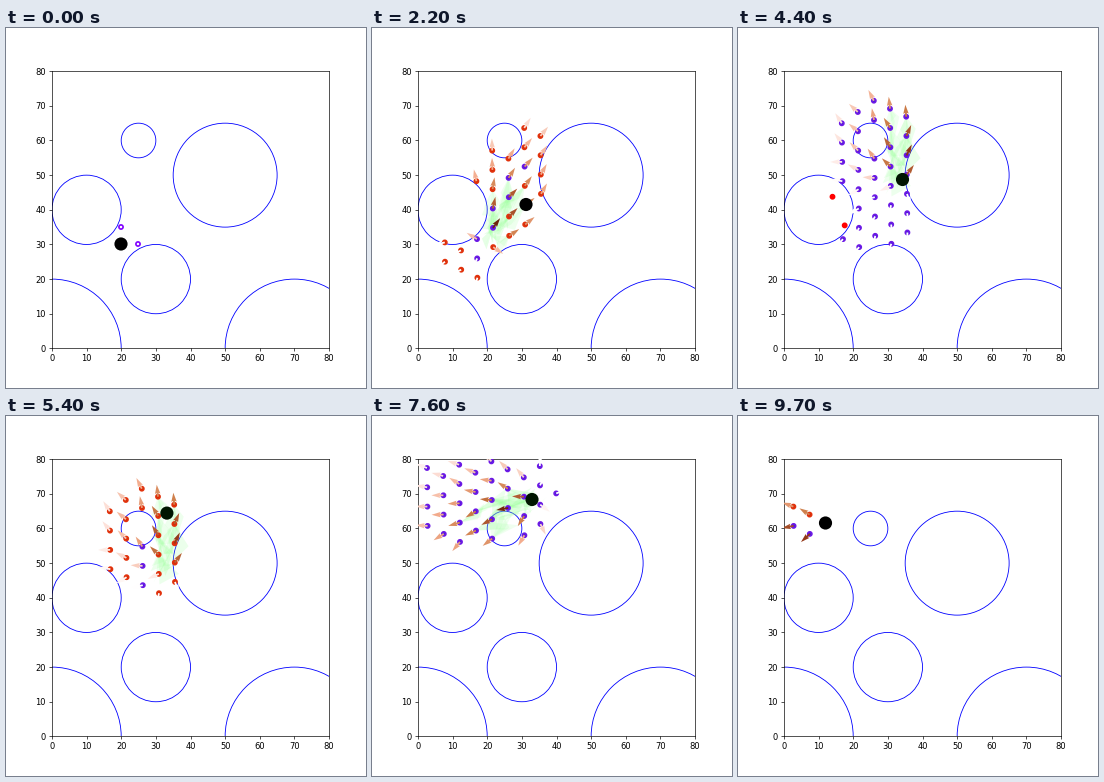
These frames come from a looping animation (360x360 px, 10000 ms). A matplotlib script:

```python
import math
import random
from collections import namedtuple

import numpy as np
import matplotlib.pyplot as plt
from matplotlib.animation import FuncAnimation
from matplotlib.collections import PolyCollection
from matplotlib.colors import LinearSegmentedColormap
from matplotlib.patches import Circle

FRAMES = 100
OBSTACLES = [(0, 0, 20), (70, 0, 20), (30, 20, 10), (10, 40, 10), (50, 50, 15), (25, 60, 5)]

# Frames in which something moves; the picture holds in between.
ACTIVE = [(0, 13), (18, 24), (26, 31), (34, 46), (51, 55), (57, 57),
          (61, 64), (67, 80), (86, 90), (92, 97)]

# Robot path in stage pixels: frame, x, y
STOPS = np.array([(0, 115, 216), (17, 115, 216), (22, 154, 176.5), (24, 164.5, 151.5),
                  (50, 164.5, 151.5), (55, 160, 83.5), (85, 160, 83.5), (90, 87.5, 107)])
HUBS = [(115, 216), (164.5, 151.5), (160, 83.5), (87.5, 107)]
HUB_STARTS = [34, 67, 92]

# Bearing in degrees, seen from the hub, in which the arrows are darkest
SWEEP = np.array([(1, 90), (13, 270), (22, 296), (31, 296), (34, 41), (44, 270),
                  (67, 263), (76, 160), (80, 115), (92, 110), (97, 162)])

# A wave fills the mesh within a radius of its spine a-b, spreading from the hub.
Wave = namedtuple('Wave', 'hub a b radius start speed leave out')
WAVES = [Wave(0, (115, 216), (115, 216), 75, 1, 8, 18, (18, 21)),
         Wave(0, (100, 228), (155, 128), 34, 1, 10, 18, (26, 34)),
         Wave(1, (140, 110), (135, 185), 42, 34, 18, 51, (51, 71)),
         Wave(2, (75, 85), (140, 80), 46, 67, 13, 86, (86, 96)),
         Wave(3, (50, 98), (66, 112), 17, 92, 20, 92, (FRAMES, FRAMES))]
SPINE_WIDTH = 9

# Loose samples: count, centre, spread, first and last frames
SAMPLES = [(9, (120, 145), (14, 32), 26, 38), (18, (156, 88), (10, 13), 61, 68)]

HEAT = LinearSegmentedColormap.from_list(
    'heat', ['white', '#fde3dc', '#f3ab8c', '#cd7d48', '#8c2f12', '#2a0a02'])
LOOKS = {'new': ('white', '#8000ff'), 'done': ('#4a1cd6', '#6d18e6'),
         'warm': ('#d42a08', '#e2320c'), 'open': ('red', 'red')}

Node = namedtuple('Node', 'pos birth death turn look bend')


def to_data(points):
    p = np.asarray(points, float)
    return np.stack([(p[..., 0] - 45.9) / 3.465, (320.4 - p[..., 1]) / 3.465], axis=-1)


def clock(frame):
    for lo, hi in reversed(ACTIVE):
        if frame >= lo:
            return min(frame, hi)


def is_free(p):
    u, v = to_data(p)
    return (0.5 < u < 80 and 0 < v < 80
            and all(math.hypot(u - a, v - b) > r - 0.8 for a, b, r in OBSTACLES))


def mesh():
    """Slanted lattice over the free space."""
    points = [(136 + 16.2 * i + 0.2 * j, 92 + 8 * i + 19.3 * j)
              for i in range(-6, 5) for j in range(-7, 12)]
    return [p for p in points if is_free(p)]


def spine_distance(p, a, b):
    p, a, b = map(np.array, (p, a, b))
    way = b - a
    s = np.clip(np.dot(p - a, way) / max(1, np.dot(way, way)), 0, 1)
    return math.dist(p, a + s * way)


def build_nodes():
    rng = random.Random(3)
    nodes = [Node(p, 0, 18, FRAMES, 'done', 0) for p in [(115, 199), (132, 216)]]
    points = mesh()
    for w in WAVES:
        goal = HUBS[min(w.hub + 1, 3)]
        for i, p in enumerate(points):
            off = spine_distance(p, w.a, w.b)
            if off > w.radius:
                continue
            birth = w.start + int(math.dist(p, HUBS[w.hub]) / w.speed)
            death = int(np.interp(math.dist(p, goal), (40, 110), w.out[::-1]))
            turn = w.leave + i % 4 if off > SPINE_WIDTH else FRAMES
            nodes.append(Node(p, birth, death, turn, 'done', rng.uniform(-0.35, 0.35)))
    for count, centre, spread, birth, death in SAMPLES:
        for i in range(count):
            p = tuple(rng.gauss(c, s) for c, s in zip(centre, spread))
            nodes.append(Node(p, birth + i % 4, death + i % 9, FRAMES, 'open', 0))
    return nodes


def bearing(p, hub):
    return math.atan2(p[1] - hub[1], p[0] - hub[0])


def heat_at(p, hub, t):
    """Darkest near the hub and along the sweeping bearing."""
    aim = math.radians(np.interp(t, SWEEP[:, 0], SWEEP[:, 1]))
    turn = abs(math.remainder(bearing(p, hub) - aim, math.tau))
    return max(0, 1 - turn / 2.6 - math.dist(p, hub) / 170)


def fan_shapes(p, hub):
    rng = np.random.default_rng(int(7 * p[0] + 3 * p[1]))
    tail, way = np.array(p), np.array(hub) - p
    way = way * min(1, 30 / max(1, math.hypot(*way)))
    return [to_data([tail, tail + way + rng.normal(0, 7, 2), tail + way * 0.6 + rng.normal(0, 8, 2)])
            for _ in range(4)]


nodes = build_nodes()

fig = plt.figure(figsize=(6, 6), dpi=60, facecolor='white')
ax = fig.add_subplot(aspect='equal')
ax.set(xlim=(0, 80), ylim=(0, 80), xticks=range(0, 81, 10), yticks=range(0, 81, 10))
for cx, cy, r in OBSTACLES:
    ax.add_patch(Circle((cx, cy), r, fill=False, ec='blue', lw=1))
robot = ax.add_patch(Circle((20, 30), 1.9, fc='black', ec='none', zorder=6))
dots = ax.scatter([], [], s=25, linewidths=2, zorder=4)
fans = ax.add_collection(PolyCollection([], linewidths=0, zorder=1.5))
quivers = []


def draw(frame):
    t = clock(frame)
    place = [np.interp(t, STOPS[:, 0], STOPS[:, k]) for k in (1, 2)]
    robot.center = tuple(to_data(place))
    robot.set_facecolor('#001600' if 34 <= t < 57 or 67 <= t < 92 else 'black')
    hub = HUBS[sum(t >= s for s in HUB_STARTS)]

    live = [n for n in nodes if n.birth <= t < n.death]
    looks = [LOOKS['new' if t == 0 else 'warm' if t >= n.turn else n.look] for n in live]
    dots.set_offsets(to_data([n.pos for n in live]))
    dots.set_facecolors([face for face, _ in looks])
    dots.set_edgecolors([edge for _, edge in looks])

    # Old arrows fade to white but still cover part of their dot.
    arrows = sorted((heat_at(n.pos, hub, t), n.pos, bearing(n.pos, hub) + n.bend)
                    for n in live if t > 0 and n.look == 'done')
    while quivers:
        quivers.pop().remove()
    if arrows:
        heats, tails, angles = (np.array(a) for a in zip(*arrows))
        tips = tails + 12 * np.stack([np.cos(angles), np.sin(angles)], axis=1)
        a, b = to_data(tails), to_data(tips)
        quivers.append(ax.quiver(*a.T, *(b - a).T, color=HEAT(heats), angles='xy',
                                 scale_units='xy', scale=1, width=0.0065, zorder=5))

    shapes, greens = [], []
    for heat, p, _ in arrows:
        if heat > 0.5 and t < HUB_STARTS[-1]:
            shapes += fan_shapes(p, hub)
            greens += [(0.55, 1, 0.55, 0.25 * heat)] * 4
    fans.set_verts(shapes)
    fans.set_facecolor(greens if greens else 'none')
    return []


anim = FuncAnimation(fig, draw, frames=FRAMES, interval=100, init_func=lambda: [],
                     repeat=True, repeat_delay=0, blit=False)
plt.show()
```
